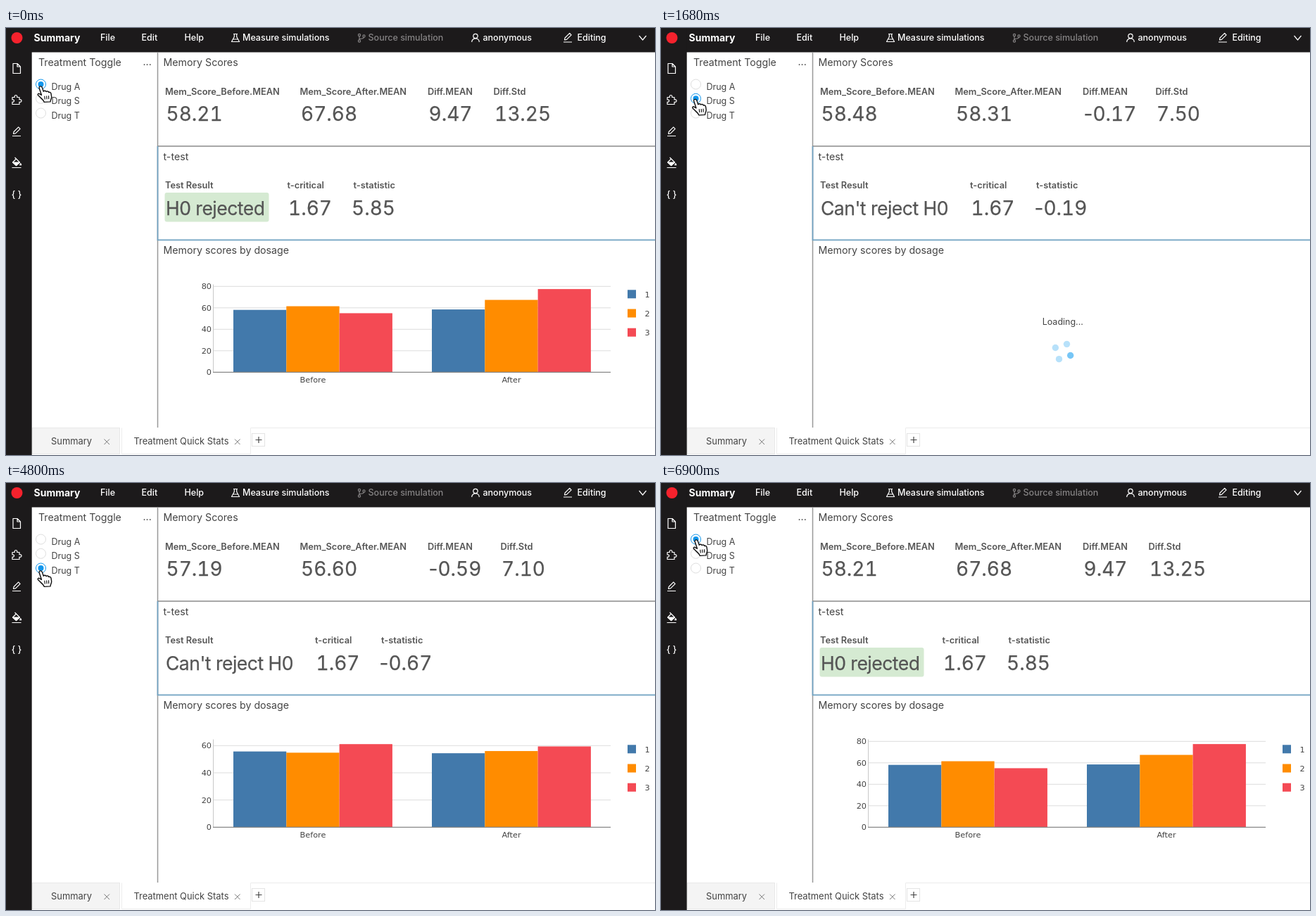
Recreate the animation shown at these times as an HTML page. Size 922 by 607 pixels, loop 6.96 s.

```html
<!DOCTYPE html>
<html lang="en">
<head>
<meta charset="utf-8">
<title>Treatment dashboard</title>
<style>
  html, body { margin: 0; width: 100%; height: 100%; overflow: hidden; background: #fff; }
  svg { display: block; width: 922px; height: 607px; }
  text { font: 12.5px Inter, sans-serif; font-optical-sizing: none; fill: #444; white-space: pre; }
  .title { font-size: 14.2px; }
  .tab { font-size: 12.9px; }
  .menu { font-weight: 500; fill: #fff; }
  .brand { font-size: 14px; font-weight: 700; fill: #fff; }
  .off { fill: #858384; }
  .label { font-size: 12.8px; font-weight: 600; fill: #555; }
  .value, .verdict { fill: #555; stroke: #555; stroke-width: .25px; }
  .value { font-size: 28px; font-variant-numeric: tabular-nums; }
  .value tspan { font-variant-numeric: normal; }
  .verdict { font-size: 26.5px; letter-spacing: -.5px; }
  .axis { font: 11.3px "DejaVu Sans", sans-serif; }
  .icon { fill: none; stroke: #fff; stroke-width: 1.2; stroke-linejoin: round; }
  .ok { fill: #d5ead2; }
  .dim { opacity: .5; }
  .dim .ok { fill: #d3dfd0; }
  .mid { text-anchor: middle; }
  .end { text-anchor: end; }
</style>
</head>
<body>
<svg id="stage" viewBox="0 0 922 607"></svg>
<script>
const LOOP = 6960;
const BLUE = '#1296ec';
const BAR_COLORS = ['#4279ab', '#ff8c00', '#f44a54'];
const RADIO_Y = [80, 100.3, 121];

const drugs = [
  { name: 'Drug A', scores: ['58.21', '67.68', '9.47', '13.25'], stdX: 692.5,
    verdict: 'H0 rejected', tests: ['1.67', '5.85'], testX: 399.5,
    unit: 1.525, max: 80, bars: [58.1, 61.5, 55, 58.5, 67.4, 77.5] },
  { name: 'Drug S', scores: ['58.48', '58.31', '-0.17', '7.50'], stdX: 702.5,
    verdict: "Can't reject H0", tests: ['1.67', '-0.19'], testX: 439,
    unit: 1.978, max: 60, bars: [56.5, 59.1, 59.8, 58.8, 58.3, 57.5] },
  { name: 'Drug T', scores: ['57.19', '56.60', '-0.59', '7.10'], stdX: 702.5,
    verdict: "Can't reject H0", tests: ['1.67', '-0.67'], testX: 439,
    unit: 1.933, max: 60, bars: [55.7, 54.8, 61.1, 54.4, 56, 59.4] }
];

// Each load: when the spinners appear, when the numbers and the chart arrive
const loads = [
  { start: 1290, numbers: 1390, chart: 1860, drug: 1 },
  { start: 3060, numbers: 3420, chart: 3480, drug: 2 },
  { start: 6060, numbers: 6360, chart: 6420, drug: 0 }
];

// Pointer stops: time, x, y
const path = [
  [0, 50, 85], [780, 50, 85], [1140, 49.5, 103], [1680, 49.5, 103.5], [2500, 49.5, 103.5],
  [2900, 50, 126], [3540, 50, 127], [4900, 50, 127], [5600, 51, 82], [LOOP, 51, 83]
];

const text = (x, y, s, cls = '') => `<text x="${x}" y="${y}" class="${cls}">${s}</text>`;
const value = (x, y, s) => text(x, y, s.replace('-', '<tspan>-</tspan>'), 'value');
const rect = (x, y, w, h, fill, more = '') =>
  `<rect x="${x}" y="${y}" width="${w}" height="${h}" fill="${fill}" ${more}/>`;
const line = (d, stroke, width = 1) =>
  `<path d="${d}" fill="none" stroke="${stroke}" stroke-width="${width}"/>`;
const icon = (x, y, body, more = '') =>
  `<g class="icon" transform="translate(${x} ${y})" ${more}>${body}</g>`;
const group = (id, body) => `<g id="${id}">${body}</g>`;

const pencil = '<path d="M-4.5 3.5l.6-3 6.6-6.6 2.4 2.4-6.6 6.6zM-6 6.5h12"/>';

function frameMarkup() {
  return rect(0, 0, 922, 34.5, '#1c1a1b') + rect(0, 0, 36.7, 607, '#1c1a1b') +
    '<circle cx="15.5" cy="14" r="8" fill="#f5222d"/>' +
    text(39.5, 18.7, 'Summary', 'brand') +
    [[134, 'File'], [192.5, 'Edit'], [253.5, 'Help'], [336, 'Measure simulations'],
      [677.5, 'anonymous'], [811.5, 'Editing']].map(([x, s]) => text(x, 18.3, s, 'menu')).join('') +
    text(514.5, 18.3, 'Source simulation', 'menu off') +
    icon(326, 14, '<path d="M-3-5.5h6M-1.7-5.5v4l-3.8 7h11l-3.8-7v-4M-3.7 2h7.4"/>') +
    icon(505, 14, '<circle cx="-3" cy="-4" r="1.6"/><circle cx="-3" cy="4.5" r="1.6"/>' +
      '<circle cx="3.5" cy="-2.5" r="1.6"/><path d="M-3-2.4v5.3M3.5-.9q0 2.4-6.5 2.4"/>',
      'style="stroke:#858384"') +
    icon(667, 14, '<circle cy="-2.5" r="3.2"/><path d="M-5.3 6c0-6.8 10.6-6.8 10.6 0"/>') +
    icon(798, 13.5, pencil) +
    icon(904.5, 14, '<path d="M-5-3L0 3 5-3"/>') +
    icon(15, 57.5, '<path d="M-5-7h6l4.5 4.5V7H-5zM1-7v4.5h4.5"/>') +
    icon(15, 102.5, '<path d="M-6-4h3.3c-1.2-4 4.6-4 3.4 0H4v3.3c4-1.2 4 4.6 0 3.4V6H-6V2.7c3.4.6 3.4-4 0-3.4z"/>') +
    icon(15, 147, pencil) +
    icon(15, 191, '<path d="M-5.5 0L-.5-5 4.5 0l-5 4.6zM-2.5-7l2 2M-6.5 7.5h13"/>' +
      '<path d="M-5 0h9L-.5 4.2zM5.7 1.5l1 2.2h-2z" fill="#fff"/>') +
    text(15, 241, '{ }', 'menu mid') +
    line('M215.5 34.5V568', '#999', 1.5) +
    line('M215 168H922', '#8a8a8a', 1.3) +
    line('M215.5 168V301.3H922', '#6fa2c2', 1.7) +
    text(46, 54, 'Treatment Toggle', 'title') + text(194.5, 52.5, '...', 'title') +
    text(223.5, 54, 'Memory Scores', 'title') +
    text(223.5, 187.5, 't-test', 'title') +
    text(223.5, 321, 'Memory scores by dosage', 'title') +
    rect(37.5, 568.5, 124, 37, '#f4f4f4', 'stroke="#e8e8e8"') +
    line('M164.5 605.5V568.5M347.5 568.5V605.5H164.5M347.5 568.5H922', '#ececec') +
    text(64, 592, 'Summary', 'tab') + text(181.5, 592, 'Treatment Quick Stats', 'tab') +
    line('M139.5 584.5l7.5 7.5m0-7.5l-7.5 7.5M325 584.5l7.5 7.5m0-7.5l-7.5 7.5', '#777') +
    rect(349.5, 576.5, 18, 18, '#fff', 'stroke="#e4e4e4"') +
    line('M354.5 585.5h9M359 581v9', '#444', 1.2);
}

function numbersMarkup(d, i) {
  const names = ['Mem_Score_Before.MEAN', 'Mem_Score_After.MEAN', 'Diff.MEAN', 'Diff.Std'];
  const xs = [226, 417.5, 599, d.stdX];
  const scores = names.map((n, k) =>
    text(xs[k], 94.7, n, 'label') + value(xs[k] + 1.5, 132.2, d.scores[k])).join('');
  const badge = d.verdict === 'H0 rejected'
    ? '<rect class="ok" x="225.5" y="234" width="148" height="41.5" rx="3"/>' : '';
  return group('numbers' + i, scores + badge +
    text(226, 228.3, 'Test Result', 'label') + text(227, 265.5, d.verdict, 'verdict') +
    text(d.testX, 228.3, 't-critical', 'label') + value(d.testX + 1.5, 265.7, d.tests[0]) +
    text(d.testX + 94, 228.3, 't-statistic', 'label') + value(d.testX + 91.5, 265.7, d.tests[1]));
}

function chartMarkup(d, i) {
  const base = 489.3;
  let out = '';
  for (let v = 0; v <= d.max; v += 20) {
    const y = base - v * d.unit;
    if (v) out += line(`M295 ${y}H859`, '#ddd');
    out += text(292, y + 4, v, 'axis end');
  }
  out += line('M294.5 364.5V489', '#c8c8c8');
  d.bars.forEach((v, k) => {
    const x = (k < 3 ? 323 : 605) + (k % 3) * 75.3;
    out += rect(x, base - v * d.unit, 75.3, v * d.unit, BAR_COLORS[k % 3]);
  });
  out += line('M294 489.3H859', '#888', 1.2) +
    text(436, 503.8, 'Before', 'axis mid') + text(718, 503.8, 'After', 'axis mid');
  BAR_COLORS.forEach((c, k) => {
    out += rect(883, 372.3 + k * 27.2, 12, 12, c) + text(907.5, 382.7 + k * 27.2, k + 1, 'axis');
  });
  return group('chart' + i, out);
}

const spinner = y => text(570.8, y - 38.2, 'Loading...', 'mid') +
  `<g class="spin" transform="translate(571 ${y})">` +
  [0, 1, 2, 3].map(i => `<circle r="4.7" fill="#129cf0" data-i="${i}"/>`).join('') + '</g>';

const radios = drugs.map((d, i) =>
  `<circle id="ring${i}" cx="49.5" cy="${RADIO_Y[i]}" r="7" fill="#fff"/>` +
  `<circle id="dot${i}" cx="49.5" cy="${RADIO_Y[i]}" r="4" fill="${BLUE}"/>` +
  text(64.5, RADIO_Y[i] + 7.8, d.name)).join('');

const hand = '<path d="M-2.6 1.5C-2.6-1.2 1-1.4 2 1.2L4 7C5 5.4 7.4 5.8 8 7.5 9 6.2 11.4 6.6 12 8.5' +
  'c1.6-.8 3 .2 3.3 2L16 15c.2 3-1.5 4-1.8 7.5L5 23C4 19.5 0 17-4 13c-1.5-2 .5-3.6 2.5-2L1 12.4z" ' +
  'fill="#fff" stroke="#111" stroke-width="1.5" stroke-linejoin="round"/>' +
  line('M5.5 14l.6 5M8.6 13.7l.4 5M11.6 13.5l.2 5', '#111', 1.2);

document.getElementById('stage').innerHTML = frameMarkup() +
  drugs.map(numbersMarkup).join('') + drugs.map(chartMarkup).join('') +
  group('waitNumbers', spinner(126) + spinner(259.4)) + group('waitChart', spinner(460)) +
  radios + group('pointer', hand);

const $ = id => document.getElementById(id);
const show = (id, on) => $(id).setAttribute('display', on ? 'inline' : 'none');
const dots = [...document.querySelectorAll('.spin circle')];

function pointerAt(t) {
  const k = path.findIndex(p => p[0] > t);
  const [t0, x0, y0] = path[k - 1], [t1, x1, y1] = path[k];
  const p = (t - t0) / (t1 - t0), e = p * p * (3 - 2 * p);
  return [x0 + (x1 - x0) * e, y0 + (y1 - y0) * e];
}

// The drug whose numbers or chart arrived last
const latest = (t, part) => loads.reduce((drug, l) => t >= l[part] ? l.drug : drug, 0);

const active = (i, t) =>
  latest(t, 'numbers') === i || Math.abs(pointerAt(t)[1] - 3 - RADIO_Y[i]) < 8;

// Ring colour follows the radio's state with a 300 ms transition
function glow(i, t) {
  let sum = 0;
  for (let lag = 0; lag < 300; lag += 30) sum += active(i, (t - lag + LOOP) % LOOP);
  return sum * 10;
}

function spin(seconds) {
  dots.forEach(dot => {
    const i = +dot.dataset.i;
    const a = (i * 90 - 90 + seconds * 300) * Math.PI / 180;
    const p = Math.max(0, seconds - i * .4) % 2;
    dot.setAttribute('cx', 12 * Math.cos(a));
    dot.setAttribute('cy', 12 * Math.sin(a));
    dot.setAttribute('opacity', .3 + .7 * (p < 1 ? p : 2 - p));
  });
}

function draw(t) {
  const picked = latest(t, 'numbers'), charted = latest(t, 'chart');
  const load = loads.find(l => t >= l.start && t < l.chart);
  const waiting = !!load && t < load.numbers;
  const [x, y] = pointerAt(t);

  drugs.forEach((d, i) => {
    show('numbers' + i, i === picked);
    $('numbers' + i).setAttribute('class', waiting ? 'dim' : '');
    show('chart' + i, i === charted && !load);
    show('dot' + i, i === picked);
    $('ring' + i).style.stroke = `color-mix(in srgb, ${BLUE} ${glow(i, t)}%, #dedede)`;
  });
  show('waitNumbers', waiting);
  show('waitChart', load);
  if (load) spin((t - load.start) / 1000);
  $('pointer').setAttribute('transform', `translate(${x - .5} ${y - 1.5}) scale(.95)`);
}

function tick() {
  draw(performance.now() % LOOP);
  requestAnimationFrame(tick);
}
tick();
</script>
</body>
</html>
```
